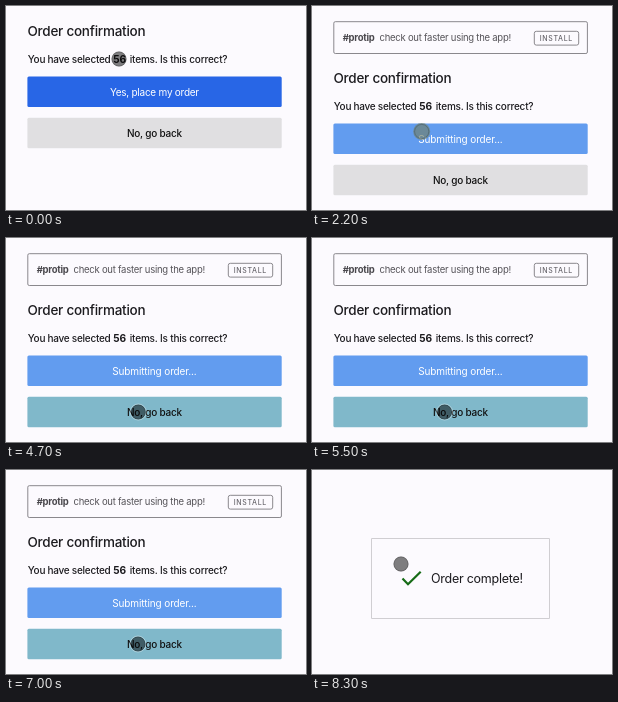
Animation of 300x204 px, one loop 8400 ms. Source, as an HTML page with a canvas:

```html
<!DOCTYPE html>
<html lang="en">
<head>
<meta charset="utf-8">
<title>Order confirmation</title>
<style>
  html, body { margin: 0; width: 100%; height: 100%; overflow: hidden; background: #fcfafe; }
  canvas { display: block; width: 300px; height: 204px; }
</style>
</head>
<body>
<canvas id="stage"></canvas>
<script>
const W = 300, H = 204, LOOP = 8400, STEP = 100;
const BG = '#fcfafe', INK = '#1c1b1f', GRAY = '#e0dfe1', LINE = '#8a888d';
const BANNER_AT = 1800, SUBMIT_AT = 2000, DONE_AT = 7200;
const BANNER_SHIFT = 47;

const canvas = document.getElementById('stage');
const ctx = canvas.getContext('2d');
const ratio = window.devicePixelRatio || 1;
canvas.width = W * ratio;
canvas.height = H * ratio;

// Pointer stops: time, x, y
const path = [
  [0, 113, 53], [300, 113, 56], [900, 112, 107], [1300, 108, 126],
  [2000, 108, 126], [2200, 109.7, 125.5], [2700, 112, 97],
  [3100, 92, 34], [3300, 98, 60], [3600, 128, 160], [3700, 130, 172],
  [4000, 132, 174], [5500, 132.6, 174], [7000, 132, 174], [7200, 131, 174],
  [7500, 134, 168], [8100, 173, 134], [8300, 89, 94], [8400, 89, 94]
];

function pointerAt(t) {
  let i = 1;
  while (i < path.length - 1 && path[i][0] <= t) i++;
  const [t0, x0, y0] = path[i - 1], [t1, x1, y1] = path[i];
  const p = (t - t0) / (t1 - t0);
  const k = p * p * (3 - 2 * p);
  return [x0 + (x1 - x0) * k, y0 + (y1 - y0) * k];
}

// Repeated clicks on the second button
function isPressed(t) {
  return t >= 4000 && t < DONE_AT && t % 500 < 300;
}

// The pointer pales for a moment after the order is sent
function isPale(t) {
  return t >= SUBMIT_AT && t < SUBMIT_AT + 300;
}

function text(str, x, y, size, { weight = 400, color = INK, gap = -0.25, align = 'left' } = {}) {
  ctx.font = `${weight} ${size}px Inter, sans-serif`;
  ctx.letterSpacing = gap + 'px';
  ctx.textAlign = align;
  ctx.fillStyle = color;
  ctx.fillText(str, x, y);
}

function box(x, y, w, h, r, fill, stroke) {
  ctx.beginPath();
  ctx.roundRect(x, y, w, h, r);
  if (fill) {
    ctx.fillStyle = fill;
    ctx.fill();
  }
  if (stroke) {
    ctx.lineWidth = 1;
    ctx.strokeStyle = stroke;
    ctx.stroke();
  }
}

function button(label, y, fill, style) {
  box(21.4, y, 254.3, 30.5, 1.5, fill);
  text(label, 148.4, y + 19.2, 10, { align: 'center', ...style });
}

function banner() {
  box(21.8, 15.7, 253.6, 31.8, 1.5, null, LINE);
  text('#protip', 30.7, 35, 9.5, { weight: 700, color: '#4a484d' });
  text('check out faster using the app!', 67.5, 35, 9.5, { color: '#555358' });
  box(222.3, 25.3, 44.4, 13.8, 2, null, LINE);
  text('INSTALL', 227.8, 34.8, 7, { weight: 500, color: '#66646a', gap: 0.65 });
}

function orderPage(t) {
  const shifted = t >= BANNER_AT, sent = t >= SUBMIT_AT;
  if (shifted) banner();
  ctx.save();
  ctx.translate(0, shifted ? BANNER_SHIFT : 0);
  text('Order confirmation', 21.5, 30, 13.5, { weight: 550, gap: -0.25 });
  text('You have selected', 21.8, 56.5, 10, { weight: 450, gap: -0.27 });
  text('56', 107.3, 56.5, 10.2, { weight: 700, gap: -0.1 });
  text('items. Is this correct?', 123.8, 56.5, 10, { weight: 450, gap: -0.2 });
  if (sent) button('Submitting order...', 70.6, '#629cef', { color: '#fff', gap: -0.13 });
  else button('Yes, place my order', 70.6, '#2866e6', { color: '#fff' });
  button('No, go back', 111.8, isPressed(t) ? '#80b8ca' : GRAY, { color: '#111', weight: 500 });
  ctx.restore();
}

function donePage() {
  box(59.5, 68.5, 178, 80, 0, null, '#d0ced2');
  ctx.beginPath();
  ctx.moveTo(90.5, 108.5);
  ctx.lineTo(96, 114.3);
  ctx.lineTo(108.7, 101.7);
  ctx.lineWidth = 2.2;
  ctx.strokeStyle = '#166b16';
  ctx.stroke();
  text('Order complete!', 119, 112.5, 12.5);
}

function pointer(t) {
  const [x, y] = pointerAt(t);
  const disc = (r) => {
    ctx.beginPath();
    ctx.arc(x, y, r, 0, Math.PI * 2);
  };
  disc(isPale(t) ? 8.5 : 7.5);
  ctx.fillStyle = isPale(t) ? 'rgba(112,128,104,0.65)' : 'rgba(0,0,0,0.5)';
  ctx.fill();
  disc(7.1);
  ctx.lineWidth = 0.8;
  ctx.strokeStyle = 'rgba(0,0,0,0.25)';
  ctx.stroke();
  if (isPressed(t)) {
    disc(8);
    ctx.lineWidth = 1;
    ctx.strokeStyle = 'rgba(255,255,255,0.35)';
    ctx.stroke();
  }
}

function draw(t) {
  ctx.setTransform(ratio, 0, 0, ratio, 0, 0);
  ctx.globalAlpha = 1;
  ctx.fillStyle = BG;
  ctx.fillRect(0, 0, W, H);
  const done = Math.min(1, Math.max(0, (t - DONE_AT + STEP) / (2 * STEP)));
  if (done < 1) {
    ctx.globalAlpha = 1 - done;
    orderPage(t);
  }
  if (done > 0) {
    ctx.globalAlpha = done;
    donePage();
  }
  ctx.globalAlpha = 1;
  pointer(t);
}

const start = performance.now();
function tick() {
  const t = (performance.now() - start) % LOOP;
  draw(Math.floor(t / STEP) * STEP);
  requestAnimationFrame(tick);
}
tick();
</script>
</body>
</html>
```
